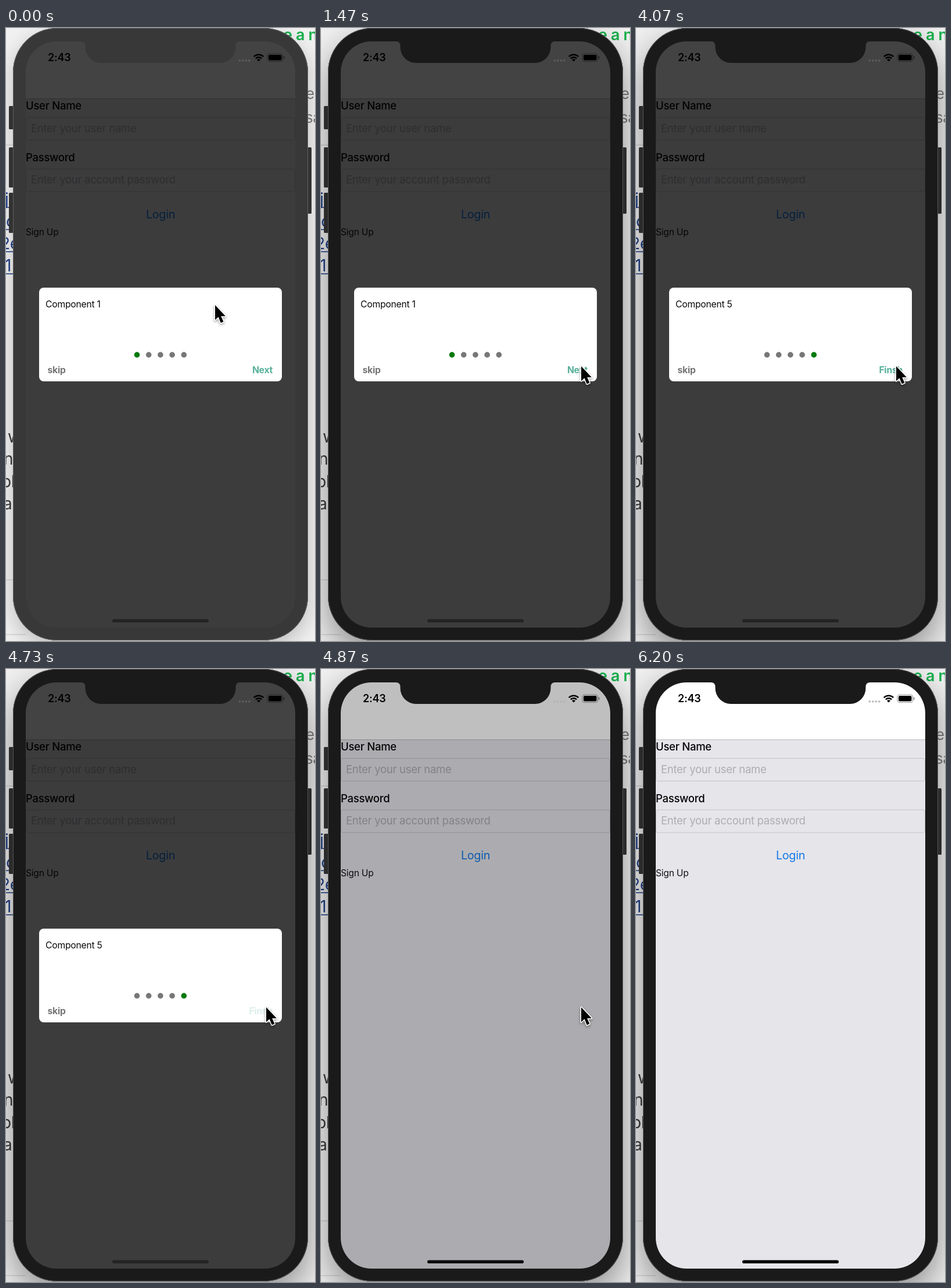
An HTML page with a canvas for the animation above (6740 ms loop, 532 px wide and 1053 px high).

```html
<!DOCTYPE html>
<html lang="en">
<head>
<meta charset="utf-8">
<title>Onboarding dialog</title>
<style>
html, body { margin: 0; width: 100%; height: 100%; overflow: hidden; background: #f1f1f1; }
canvas { display: block; width: 532px; height: 1053px; }
</style>
</head>
<body>
<canvas id="stage" width="532" height="1053"></canvas>
<script>
const ctx = document.getElementById('stage').getContext('2d');
const LOOP = 6740, LAST = 6200, FPS = 15;
const FOCUS = 1200, SLIDE = 4751, SLIDE_MS = 300, CURSOR_OFF = 6125;
const DIM = 0.738;
const BODY = [12, 0, 508, 1052, 76];
const SCREEN = [34, 23, 464, 1007, 53];
const CLICKS = [1785, 2335, 2885, 3435];
const TRACK = [[130, 359, 475], [690, 468, 591], [1100, 447, 580]];

const clamp = (v) => Math.max(0, Math.min(1, v));
const gray = (v) => `rgb(${v},${v},${v})`;
const quad = (p) => p < 0.5 ? 2 * p * p : 1 - 2 * (1 - p) * (1 - p);

// CSS "ease" curve, solved by bisection
function ease(x) {
  const bez = (s, a, b) => 3 * s * (1 - s) * (1 - s) * a + 3 * s * s * (1 - s) * b + s * s * s;
  let lo = 0, hi = 1;
  for (let i = 0; i < 20; i++) {
    const mid = (lo + hi) / 2;
    if (bez(mid, 0.25, 0.25) < x) lo = mid; else hi = mid;
  }
  return x >= 1 ? 1 : bez(lo, 0.1, 1);
}

function rounded(x, y, w, h, r) {
  ctx.beginPath();
  ctx.roundRect(x, y, w, h, r);
}

function box(x, y, w, h, r, color) {
  rounded(x, y, w, h, r);
  ctx.fillStyle = color;
  ctx.fill();
}

function disc(x, y, r, color) {
  ctx.beginPath();
  ctx.arc(x, y, r, 0, 7);
  ctx.fillStyle = color;
  ctx.fill();
}

function label(text, x, y, size, color, weight = 400, align = 'left') {
  ctx.font = `${weight} ${size}px Inter, Roboto, sans-serif`;
  ctx.letterSpacing = `${-0.015 * size}px`;
  ctx.textAlign = align;
  ctx.fillStyle = color;
  ctx.fillText(text, x, y);
}

function drawPage() {
  box(0, 0, 532, 1053, 0, '#f1f1f1');
  for (const y of [201, 948, 1042]) box(0, y - 0.5, 34, 1, 0, '#c4c4c4');
  const links = [['j', -2, 304], ['c', 0, 342], ['2e', -10, 380], ['1(', -2, 418]];
  for (const [text, x, y] of links) {
    label(text, x, y, 28, '#1f3f86');
    box(0, y + 3.5, 20, 1.6, 0, '#1f3f86');
  }
  const words = [['w', 3, 712], ['n', -4, 750], ['pl', -8, 789], ['ar', -5, 827]];
  for (const [text, x, y] of words) label(text, x, y, 28, '#3a3a3a');
  label('e', 516, 122, 26, '#7d7d7d');
  label('sa', 515, 163, 26, '#7d7d7d');
  label('e a n', 477, 21, 27, '#17b14c', 600);
}

function drawShell(active) {
  ctx.save();
  ctx.shadowColor = active ? 'rgba(0,0,0,.42)' : 'rgba(0,0,0,.22)';
  ctx.shadowBlur = active ? 60 : 36;
  ctx.shadowOffsetY = active ? 24 : 12;
  box(...BODY, '#1a1a1a');
  ctx.restore();
  for (const [x, y, h] of [[5, 134, 40], [5, 205, 69], [5, 283, 69], [518, 205, 114]]) {
    box(x, y, 8, h, 1.5, active ? '#2b2b2b' : '#323232');
  }
}

function drawField(title, hint, y) {
  label(title, 34, y, 18.5, '#050506', 500);
  rounded(34.5, y + 13.5, 463, 39, 3);
  ctx.strokeStyle = '#c3c3c7';
  ctx.lineWidth = 1;
  ctx.stroke();
  label(hint, 43, y + 38.5, 18.5, '#adadb2');
}

function drawLogin() {
  box(34, 23, 464, 1007, 0, '#e5e5ea');
  box(34, 23, 464, 98, 0, '#fff');
  box(34, 121, 464, 1, 0, '#b8b8bb');
  drawField('User Name', 'Enter your user name', 140);
  drawField('Password', 'Enter your account password', 228.5);
  label('Login', 266, 327, 19.8, '#1478e6', 400, 'center');
  label('Sign Up', 34, 356, 15.6, '#111113');
}

function drawStatus(dim) {
  label('2:43', 72, 57, 18, '#000', 600);
  const dot = gray(Math.round(190 - dim * dim * 180));
  for (let i = 0; i < 4; i++) disc(402.3 + i * 5.5, 55.8, 1.9, dot);

  ctx.fillStyle = ctx.strokeStyle = '#000';
  ctx.lineWidth = 2.5;
  const from = -Math.PI * 0.75, to = -Math.PI * 0.25;
  ctx.beginPath();
  ctx.moveTo(435, 57.5);
  ctx.arc(435, 57.5, 4.3, from, to);
  ctx.fill();
  for (const r of [7.2, 11.7]) {
    ctx.beginPath();
    ctx.arc(435, 57.5, r, from, to);
    ctx.stroke();
  }

  rounded(450, 44, 26.5, 13.5, 4);
  ctx.strokeStyle = 'rgba(0,0,0,.4)';
  ctx.lineWidth = 1.2;
  ctx.stroke();
  box(452, 46, 22.5, 9.5, 2.2, '#000');
  box(477.8, 48.4, 1.7, 4.8, 1, 'rgba(0,0,0,.45)');
  box(183, 1015.4, 166, 5.6, 2.8, gray(Math.round(47 * dim)));
}

function drawCard(y, page, press) {
  box(57, y, 418, 161, 8, '#fff');
  label('Component ' + (page + 1), 68, y + 34, 15.7, '#0a0a0a');
  for (let i = 0; i < 5; i++) {
    disc(225.5 + i * 20.2, y + 115.4, 4.8, i === page ? '#047a0c' : '#777');
  }
  label('skip', 71.5, y + 146.5, 15.7, '#757575', 700);
  ctx.globalAlpha = press;
  label(page === 4 ? 'Finsh' : 'Next', 459, y + 146.5, 15.7, '#57b09a', 700, 'right');
  ctx.globalAlpha = 1;
}

// Frame around the screen, its thin rim and the notch
function drawBezel(color) {
  rounded(...BODY);
  ctx.roundRect(...SCREEN);
  ctx.fillStyle = color;
  ctx.fill('evenodd');

  rounded(12.5, 0.5, 507, 1051, 75.5);
  ctx.strokeStyle = 'rgba(125,125,125,.6)';
  ctx.lineWidth = 1;
  ctx.stroke();

  ctx.beginPath();
  ctx.moveTo(129, 22);
  ctx.lineTo(129, 23);
  ctx.quadraticCurveTo(136.5, 23, 136.5, 31);
  ctx.arcTo(136.5, 60, 166, 60, 27);
  ctx.lineTo(366, 60);
  ctx.arcTo(395.5, 60, 395.5, 31, 27);
  ctx.lineTo(395.5, 31);
  ctx.quadraticCurveTo(395.5, 23, 403, 23);
  ctx.lineTo(403, 22);
  ctx.fill();
}

function drawCursor(x, y) {
  const shape = [[1, 1.5], [1, 27], [6.6, 21.8], [10.8, 32], [15.4, 30.1], [11.2, 20.4], [18.9, 20.4]];
  ctx.save();
  ctx.translate(x, y - 0.5);
  ctx.beginPath();
  shape.forEach((p) => ctx.lineTo(...p));
  ctx.closePath();
  ctx.shadowColor = 'rgba(0,0,0,.4)';
  ctx.shadowBlur = 4;
  ctx.shadowOffsetY = 2;
  ctx.lineJoin = 'round';
  ctx.strokeStyle = '#fff';
  ctx.lineWidth = 3;
  ctx.stroke();
  ctx.shadowColor = 'transparent';
  ctx.fillStyle = '#000';
  ctx.fill();
  ctx.restore();
}

function cursorAt(t) {
  let [t0, x0, y0] = TRACK[0];
  for (const [t1, x1, y1] of TRACK.slice(1)) {
    if (t < t1) {
      const p = quad(clamp((t - t0) / (t1 - t0)));
      return [x0 + (x1 - x0) * p, y0 + (y1 - y0) * p];
    }
    [t0, x0, y0] = [t1, x1, y1];
  }
  return [x0, y0];
}

// Button opacity: fades to 0.2 while held, back to 1 after release
function pressAt(t) {
  const fade = (start) => 1 - 0.8 * quad(clamp((t - start) / 150));
  if (t > 4540) return fade(4540);
  for (const c of CLICKS) {
    if (t >= c - 150 && t < c) return fade(c - 150);
    if (t >= c && t < c + 250) return 0.2 + 0.8 * quad((t - c) / 250);
  }
  return 1;
}

function draw(t) {
  const active = t >= FOCUS;
  const out = ease(clamp((t - SLIDE) / SLIDE_MS));
  const dim = DIM * (1 - out);
  const page = CLICKS.filter((c) => t >= c).length;

  drawPage();
  drawShell(active);
  ctx.save();
  rounded(...BODY);
  ctx.clip();
  drawLogin();
  box(34, 23, 464, 1007, 0, `rgba(0,0,0,${dim})`);
  drawStatus(dim);
  if (out < 1) drawCard(446 + out * 1007, page, pressAt(t));
  ctx.restore();
  drawBezel(active ? '#1a1a1a' : '#383838');
  if (t < CURSOR_OFF) drawCursor(...cursorAt(t));
}

const start = performance.now();
function tick() {
  const t = (performance.now() - start) % LOOP;
  const step = Math.floor((t + 4) * FPS / 1000);
  draw(Math.min(LAST, step * 1000 / FPS));
  requestAnimationFrame(tick);
}
tick();
</script>
</body>
</html>
```
